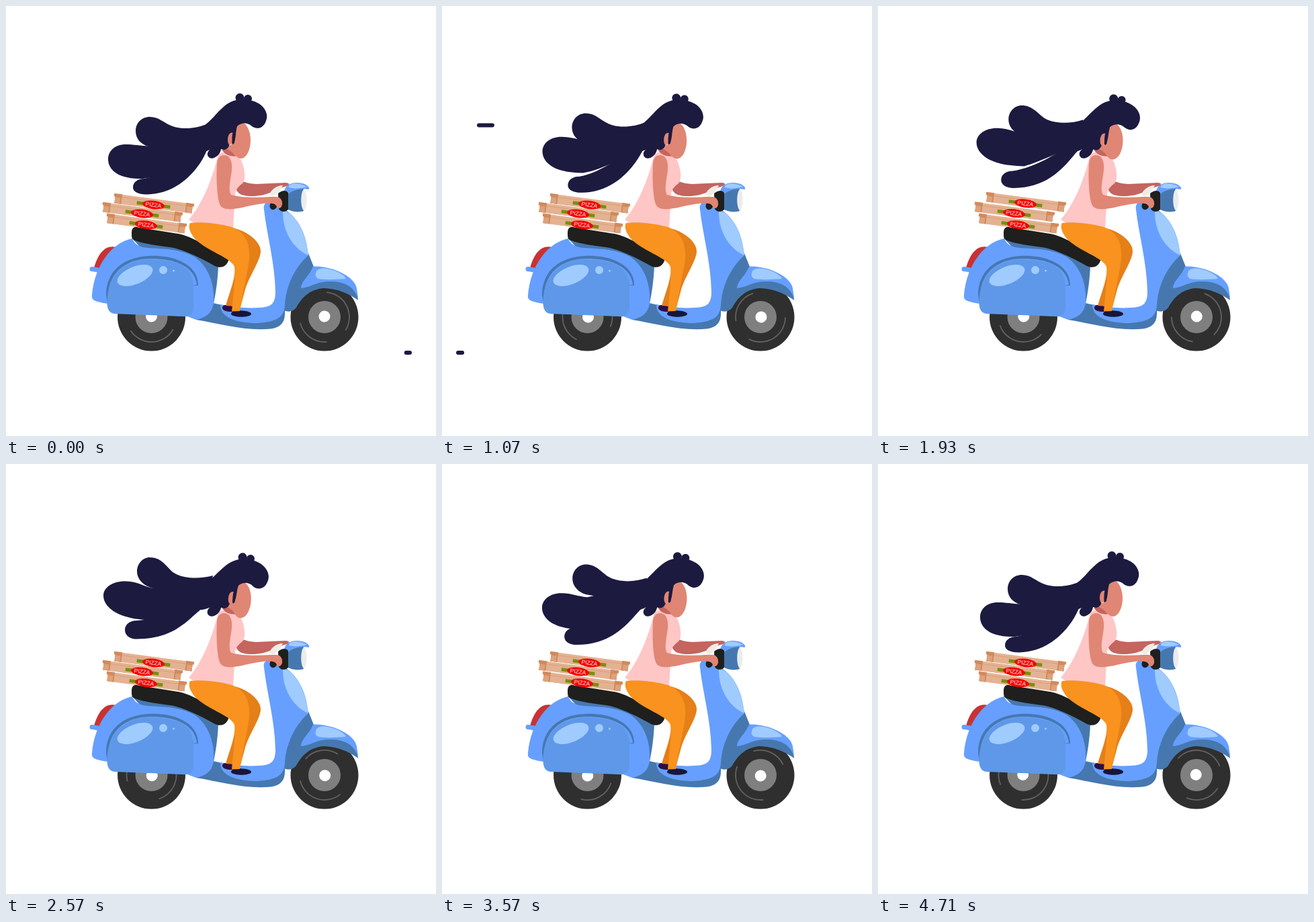
These frames come from a looping animation (640x640 px, 4.78 s). An HTML page:

```html
<!DOCTYPE html>
<html lang="en">
<head>
<meta charset="utf-8">
<title>Pizza delivery</title>
<style>
  html, body { margin: 0; width: 100%; height: 100%; overflow: hidden; background: #fff; }
  svg { display: block; width: 100vw; height: 100vh; }
  .navy { fill: #1d1a40; }
  .black { fill: #1f1f1d; }
  .blue { fill: #669fff; }
  .panel { fill: #5f98e8; }
  .steel { fill: #4678af; }
  .shine { fill: #9fcbff; }
  .skin { fill: #e08674; }
  .shade { fill: #c4655f; }
  .speed { stroke: #1d1a40; stroke-width: 6; stroke-linecap: round; }
  .rim { fill: none; stroke: #626262; stroke-width: 1.8; stroke-linecap: round; }
  text { font: 8.4px "Liberation Sans", Arial, sans-serif; fill: #fff; text-anchor: middle; }
</style>
</head>
<body>
<svg viewBox="0 0 640 640">
  <defs>
    <g id="box">
      <path fill="#e4b292" d="M-50-9H50V5H-58V-5H-50Z"/>
      <path fill="#e4b292" d="M-58-5H58V5H-58Z"/>
      <path fill="#d99f78" d="M-50-5.500H50V-4.500H-50Z"/>
      <path fill="#d08a5c" d="M-60-9.500H-48V5H-58V-5H-60ZM60-9.500H48V5H58V-5H60Z"/>
      <path fill="#dca27c" d="M-58-4H-50V5H-58ZM50-4H58V5H50Z"/>
      <path fill="#788f10" d="M-25-2.500H25V2.500H-25Z"/>
      <ellipse rx="16.500" ry="6.200" fill="#f40000"/>
      <text y="2.900">PIZZA</text>
    </g>
    <g id="tyre">
      <circle r="50.500" fill="#2f2f2f"/>
      <circle r="24" fill="#7f7f7f"/>
    </g>
  </defs>

  <line class="speed" id="ground" y1="516" y2="516"/>
  <line class="speed" id="breeze" y1="177.500" y2="177.500"/>

  <g transform="translate(216.500 463)"><use href="#tyre"/>
    <g id="rear"><path class="rim"/><path class="rim"/><circle cy="-1" r="8.500" fill="#fff"/></g>
  </g>
  <g transform="translate(474 463)"><use href="#tyre"/>
    <g id="front"><path class="rim"/><path class="rim"/><circle cy="-1" r="8.500" fill="#fff"/></g>
  </g>

  <g id="frame">
    <path class="steel" d="M300 440L325 446L400 455L415 452C416 468 412 478 394 480.500C355 484 320 473 283 467Z"/>
  </g>

  <g id="back">
    <path fill="#c93232" d="M131 390C137 369 147 355 164 359C155 368 152 380 150 390Z"/>
    <path d="M128 391.500C134 392 140 394 146 395" fill="none" stroke="#669fff" stroke-width="7" stroke-linecap="round"/>
    <path class="steel" d="M187 345L250 352L316 387C315 410 312 428 309 443L290 458Z"/>
    <path class="blue" d="M188 346C158 352 132 385 128 430C127 437 130 440 151 443L270 462L283 467C297 464 306 458 309 443C311 415 302 388 280 373C255 359 222 362 204 359C195 357 190 352 188 346Z"/>
    <path class="steel" d="M149 430C149 396 173 374 212 372C252 370 287 386 286 416L280 416L151 442Z"/>
    <path class="blue" d="M284 415C281 388 252 376 216 376C175 376 153 400 152 430Z"/>
    <path class="panel" d="M151 432C154 404 172 381 208 377C250 377 277 386 279 414L279 448C279 459 273 463 262 462L161 458C152 457 149 448 151 432Z"/>
    <ellipse class="shine" rx="28" ry="13" transform="translate(192 401) rotate(-22)"/>
    <circle class="shine" cx="234" cy="393" r="6"/>
    <circle class="shine" cx="249.500" cy="394" r="1.500"/>
    <path class="black" d="M187 338C187 328 192 328 200 330L250 338C278 341 303 362 332 374C331 386 322 392 311 387C290 375 264 362 244 359C228 357 205 354 192 349C187 347 187 344 187 338Z"/>
  </g>

  <use id="box0" href="#box"/>
  <use id="box1" href="#box"/>
  <use id="box2" href="#box"/>

  <g id="rider">
    <!-- front fender and shield -->
    <path class="steel" d="M450 368L458 388C485 390 522 410 524 438C509 427 490 420 472 420C452 422 440 434 432 449C427 455 420 456 414 453C412 420 428 392 450 368Z"/>
    <path class="blue" d="M457 387.500C490 387 519 404 522 420L524.500 437C518 415 500 409 478 410C462 411 452 419 439 420C440 408 452 402 457 387.500Z"/>
    <path class="shine" d="M461 398C462 388 478 389 492 395C502 400 507 404 505 406C492 407 475 408 465 406C461 404 460 401 461 398Z"/>
    <path class="blue" d="M384 303C382 294 389 289 398 292L414 302C436 316 447 340 450 371C430 389 417 415 415 445C414 463 404 470 374 472C342 472 318 463 319 444C340 449 365 451 386 448C396 446 401 441 401 425C400 380 388 340 384 303Z"/>
    <path class="shine" d="M412 304C434 310 446 340 450 371C432 364 411 340 412 304Z"/>

    <!-- far arm and handlebar -->
    <path class="shade" d="M341 262C350 257 353 264 372 265L416 263C423 263 423 267 415 269C400 273 390 284 362 283C348 282 341 278 341 262Z"/>
    <path fill="#f0ede6" d="M392 281C394 274 402 267 412 267C410 273 404 279 398 284Z"/>
    <path class="steel" d="M418 274L443 271V305C434 308 425 306 418 302Z"/>
    <path class="blue" d="M414 276C416 265 428 261 441 264C449 266 452 270 451 273C440 271 428 273 420 280Z"/>
    <path class="shine" d="M421 270C420 263 437 262 448 269C438 272 426 272 421 270Z"/>
    <path fill="#ececec" d="M443 273C449 276 449 300 443 304.500C438 299 438 278 443 273Z"/>
    <path class="black" d="M405 279C411 274 417 274 420 278V303C416 307 409 307 406 302Z"/>
    <ellipse class="black" rx="5.500" ry="7.500" transform="translate(398.500 296) rotate(25)"/>

    <path fill="#ffc6c6" d="M316 221C324 213 345 218 351 232C356 245 357 258 352 264C347 268 342 272 341 280L338 333C315 334 290 332 272 318C290 297 305 265 316 221Z"/>
    <g id="legs">
      <path fill="#2a0f45" d="M322 450C322 443 330 445 342 447L350 455H336C328 455 323 453 322 450Z"/>
      <path fill="#e57f18" d="M335 330C360 334 380 352 379 366C378 380 362 402 356 422L349 448L327 446C333 425 342 405 341 385Z"/>
      <path fill="#16163a" d="M335 459C335 452 345 453 352 453.500C362 454 366 457 365 459C361 464 340 464 335 459Z"/>
      <path fill="#f9921e" d="M274 323C290 321 315 323 336 329C356 336 366 355 361 385C358 402 352 430 348 454L336 454.500C338 430 342 405 340 388C335 374 296 364 280 345C273 336 271 328 274 323Z"/>
    </g>
    <path class="skin" d="M314 234C315 221 325 220 331 224C337 230 337 240 335 252C333 265 331 275 335 281C355 287 380 284 401 284C408 283 412 289 411 296C409 303 404 302 402 297C398 291 380 294 360 298C342 302 326 306 319 297C313 285 313 250 314 234Z"/>
    <path class="skin" d="M322 210L342 205V224C334 224 326 221 322 214Z"/>
    <path class="shade" d="M322 211C330 212 336 216 341 223C333 224 326 221 322 215Z"/>

    <path class="navy" id="crest"/>
    <path class="navy" id="wave"/>
    <path class="navy" id="tail"/>
    <g id="head">
      <ellipse class="skin" cx="349.500" cy="200" rx="14.500" ry="27"/>
      <path class="navy" d="M292 180C305 172 312 160 325 149C340 136 360 136 376 145C386 151 391 162 387 171C383 183 373 184 366 179C360 173 350 173 344 179C341 190 343 198 338 206C335 204 337 200 335 198C332 206 333 212 325 214L320 213C319 222 309 229 303 226C297 222 300 214 308 211C303 214 298 217 290 218Z"/>
      <path class="skin" d="M338 189C332 186 328 197 331 205C335 210 338 202 338 189Z"/>
      <path class="navy" d="M341 185L340 204C336 208 336 200 337 190Z"/>
      <circle class="navy" cx="348" cy="136.500" r="6.500"/>
      <circle class="navy" cx="360" cy="138" r="6"/>
    </g>
  </g>
</svg>
<script>
  const LOOP = 4780, TURNS = 10;
  const $ = id => document.getElementById(id);
  const clamp = u => Math.max(0, Math.min(1, u));
  const ease = (t, from, to) => { const u = clamp((t - from) / (to - from)); return u * u * (3 - 2 * u); };
  const bump = (t, from, to) => Math.sin(Math.PI * clamp((t - from) / (to - from))) ** 2;
  const mix = (a, b, p) => a + (b - a) * p;

  // Hair locks: resting shape, lifted shape, and amount of lift at each key time.
  const times = [0, 570, 1430, 1930, 2570, 3570, 4710];
  const locks = {
    crest: {
      low: 'M300 175C284 183 262 184 248 179C234 174 228 165 214 165C202 165 193 174 193 186C193 198 201 206 212 209L300 215Z',
      high: 'M308 166C290 171 262 172 247 160C237 150 230 139 214 139C203 139 195 149 195 160C195 172 206 182 219 185L300 205Z',
      lift: [0, .08, .32, .65, 1, .6, 0]
    },
    wave: {
      low: 'M213 208.500C200 208 190 206 178 206C162 206 152 216 152 228C152 242 164 252 180 255C188 257 195 257 203 257C240 254 268 232 300 212L300 185Z',
      high: 'M220 185C205 183 198 175 178 174.500C160 174 145 183 145 196C145 210 160 222 178 227C190 231 205 232 222 233C240 226 262 216 300 205L300 175Z',
      lift: [0, .14, .53, .77, 1, .44, 0]
    },
    tail: {
      low: 'M300 212C290 240 258 280 210 280.500C196 280.500 189 276 189 270C189 263 195 257 206 257C240 250 270 225 300 195Z',
      high: 'M303 210C278 216 265 260 194 260.500C184 260.500 177 255 177 247C177 239 184 233 195 233C215 232 260 222 300 195Z',
      lift: [0, .09, .2, .48, 1, .57, 0]
    }
  };

  function keyed(values, t) {
    const n = values.length;
    if (t >= times[n - 1]) return values[n - 1];
    const i = times.findIndex(k => k > t) - 1;
    const slope = j => j < 1 || j > n - 2 ? 0 : (values[j + 1] - values[j - 1]) / (times[j + 1] - times[j - 1]);
    const span = times[i + 1] - times[i], u = (t - times[i]) / span;
    return mix(values[i], values[i + 1], u * u * (3 - 2 * u))
      + span * u * (1 - u) * (slope(i) * (1 - u) - slope(i + 1) * u);
  }

  function morph(low, high, p) {
    const goal = high.match(/[\d.]+/g);
    let i = 0;
    return low.replace(/[\d.]+/g, v => mix(+v, +goal[i++], p).toFixed(2));
  }

  function arc(r, from, to) {
    const at = a => [Math.cos(a * Math.PI / 180) * r, Math.sin(a * Math.PI / 180) * r];
    return `M${at(from)}A${r} ${r} 0 0 1 ${at(to)}`;
  }
  function setRims(id, ...spans) {
    $(id).querySelectorAll('.rim').forEach((rim, i) => rim.setAttribute('d', arc(37, ...spans[i])));
  }
  setRims('rear', [30, 145], [-150, -65]);
  setRims('front', [-85, 30], [85, 165]);

  const move = (id, value) => $(id).setAttribute('transform', value);

  function speedLine(id, start, end, headTimes, tailTimes, t) {
    const head = mix(start, end, ease(t, ...headTimes)), tail = mix(start, end, ease(t, ...tailTimes));
    const line = $(id);
    line.setAttribute('x1', head);
    line.setAttribute('x2', tail);
    line.style.display = tail - head > .01 ? '' : 'none';
  }

  function draw() {
    const t = performance.now() % LOOP;
    const bob = bump(t, 1130, 1800);

    for (const wheel of ['rear', 'front']) move(wheel, `rotate(${t / LOOP * TURNS * 360})`);
    // The back kicks up and tilts; the frame and rider only rise.
    move('back', `matrix(1 ${.0145 * bob} 0 1 0 ${-9.1 * bob})`);
    for (const part of ['frame', 'rider']) move(part, `translate(0 ${-3.2 * bob})`);
    move('legs', `matrix(1 0 ${.052 * bob} 1 ${-.052 * 325 * bob} 0)`);

    const place = (id, x, y, hop) => move(id, `translate(${x} ${y - 8.4 * bob - hop}) rotate(7.5)`);
    place('box0', 208.5, 325.7, 0);
    place('box1', 202.5, 309, 2.5 * bump(t, 1350, 2030));
    place('box2', 219.5, 296, 5 * bump(t, 1350, 2100));

    for (const id in locks) {
      const { low, high, lift } = locks[id];
      $(id).setAttribute('d', morph(low, high, keyed(lift, t)));
    }
    const nod = keyed(locks.crest.lift, t);
    move('head', `translate(0 ${nod}) rotate(${3 * nod} 325 215)`);

    speedLine('ground', 601, 24, [-35, 600], [0, 1140], t);
    speedLine('breeze', 139, 55, [300, 850], [640, 1270], t);
    requestAnimationFrame(draw);
  }
  draw();
</script>
</body>
</html>
```
